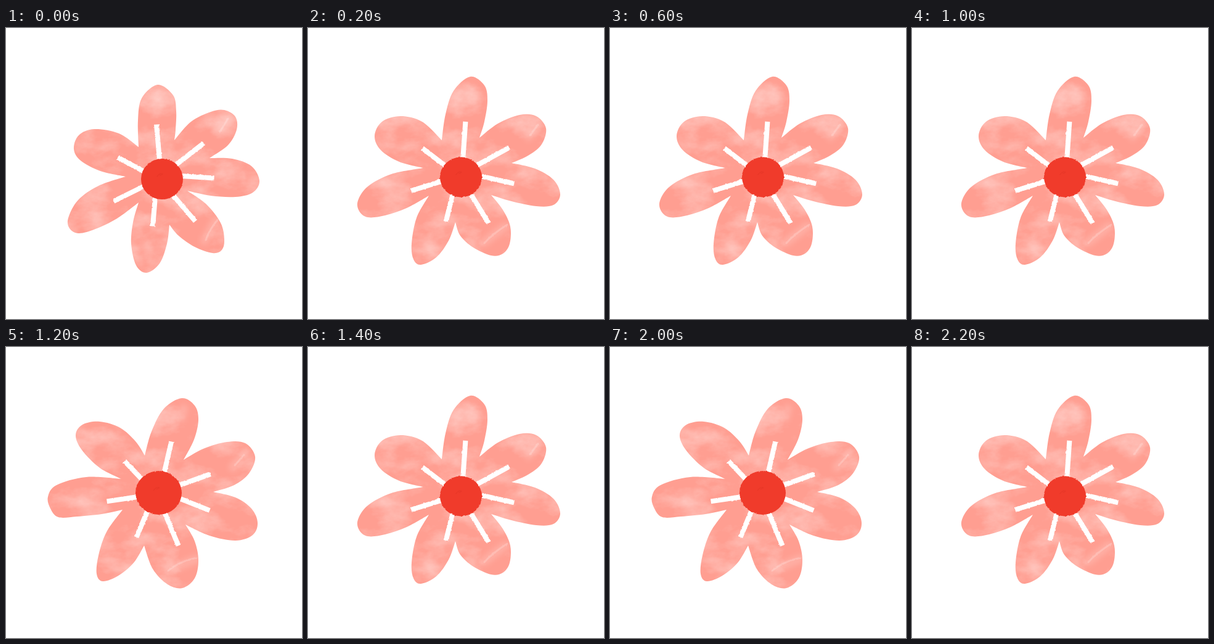
Write an HTML page that moves like this. It is 480 px wide and 472 px high and loops after 2.4 s.

```html
<!DOCTYPE html>
<html lang="en">
<head>
<meta charset="utf-8">
<title>Flower</title>
<style>
  html, body { margin: 0; width: 100%; height: 100%; overflow: hidden; background: #fff; }
  svg { display: block; width: 480px; height: 472px; }
</style>
</head>
<body>
<svg viewBox="0 0 480 472" fill="none" stroke-linecap="round">
  <defs>
    <filter id="wash" filterUnits="userSpaceOnUse" x="0" y="0" width="480" height="472" color-interpolation-filters="sRGB">
      <feTurbulence type="fractalNoise" baseFrequency=".018 .03" numOctaves="5" seed="4"/>
      <feColorMatrix values="0 0 0 0 1  0 0 0 0 1  0 0 0 0 1  .8 0 0 0 -.33"/>
      <feComposite in2="SourceGraphic" operator="atop"/>
    </filter>
    <filter id="rough" filterUnits="userSpaceOnUse" x="0" y="0" width="480" height="472" color-interpolation-filters="sRGB">
      <feTurbulence type="fractalNoise" baseFrequency=".25" numOctaves="2" seed="7"/>
      <feDisplacementMap in="SourceGraphic" scale="2.5" xChannelSelector="R" yChannelSelector="G"/>
    </filter>
    <filter id="soft" filterUnits="userSpaceOnUse" x="0" y="0" width="480" height="472">
      <feGaussianBlur stdDeviation="4"/>
    </filter>
    <clipPath id="inside"><path id="clip"/></clipPath>
  </defs>
  <path id="petals" fill="#ff9e91" filter="url(#wash)"/>
  <g clip-path="url(#inside)" stroke="#fff">
    <path id="glow" stroke-width="14" stroke-opacity=".17" filter="url(#soft)"/>
    <path id="streak" stroke-width="3" stroke-opacity=".2" filter="url(#rough)"/>
  </g>
  <g filter="url(#rough)">
    <path id="veins" stroke="#fff" stroke-width="8" stroke-linecap="butt"
      d="M244 156.5 249 214M320.5 187 274 223M337.5 243.5 284 240M307 313.5 268 268M238 321.5 242 274M174.5 281 223 257M181.5 210 226 234"/>
    <ellipse id="heart" fill="#f03b2b"/>
  </g>
  <path id="fleck" stroke="#d93224" stroke-opacity=".4" stroke-width="1.2" d="M-8-4Q-5-9 0-9M-3-6 1-8"/>
</svg>
<script>
const $ = id => document.getElementById(id);
const set = (id, attrs) => Object.entries(attrs).forEach(([k, v]) => $(id).setAttribute(k, v));

// Petals run clockwise from the top one; each starts in the notch before it.
const left = {
  petals: `215 193 214 150 220 114 246 92 271 109 276 135 275 165
    |273 182 300 152 332 136 354 133 372 144 374 165 360 190
    |330 211 367 212 398 224 411 248 400 267 372 274 332 272
    |294 264 325 286 348 316 354 343 350 360 335 365 306 355 280 337
    |265 319 261 350 249 382 228 397 211 385 203 350 206 315
    |215 283 180 309 145 326 118 333 103 325 101 308 117 279 150 256
    |194 241 153 232 121 215 110 196 118 174 143 164 183 171`,
  heart: [253, 245, 34, 33],
  turn: 'rotate(0)',
  glow: 'M230 350 234 362M345 168 362 145M322 345 340 312M252 128 248 112',
  streak: 'M324 344Q328 330 343 311M347 168 360 147'
};
const middle = {
  petals: `217 182 223 140 236 102 263 79 286 93 291 118 286 152
    |278 178 308 155 343 141 370 143 386 163 378 190 355 208
    |330 219 368 228 398 246 409 270 398 287 370 289 330 281
    |297 271 316 295 328 322 327 350 316 366 297 369 268 356 247 337
    |239 315 228 345 208 372 183 384 171 375 168 350 176 308
    |196 272 160 292 125 304 97 307 83 297 81 280 97 257 135 237
    |187 227 148 217 118 198 108 175 120 152 150 143 185 152`,
  heart: [248, 242, 34, 32.5],
  turn: 'translate(-2.5 -3.6) rotate(9 257.4 244.6)',
  glow: 'M192 345 200 352M358 176 374 154M285 348 320 322M266 112 264 98',
  streak: 'M286 349Q298 335 323 319M360 174 373 157'
};
const right = {
  petals: `225 176 236 137 256 100 285 83 306 95 312 118 305 150
    |288 183 320 165 358 154 388 156 404 178 394 205 370 224
    |336 235 372 244 398 262 408 285 400 305 372 314 330 306
    |291 288 306 315 312 346 306 375 286 391 262 385 238 360
    |224 322 207 350 182 371 157 380 147 368 150 338 163 300
    |189 264 155 271 115 275 85 276 72 262 68 243 82 224 130 211
    |187 214 152 196 123 167 113 143 124 126 152 121 185 131 210 153`,
  heart: [247.5, 236.5, 37.5, 35.5],
  turn: 'translate(-3.7 -3.2) rotate(18 257.4 244.6)',
  glow: 'M168 345 176 352M368 195 388 172M264 362 308 344M284 115 288 100',
  streak: 'M263 363Q280 348 309 342M371 192 386 175'
};

// Smooth curve along each petal, sharp corners at the notches.
function outline(text) {
  const petals = text.split('|').map(s => {
    const n = s.trim().split(/\s+/).map(Number);
    return n.flatMap((x, i) => i % 2 ? [] : [[x, n[i + 1]]]);
  });
  let d = 'M' + petals[0][0];
  petals.forEach((petal, k) => {
    const pts = [...petal, petals[(k + 1) % petals.length][0]];
    for (let i = 0; i + 1 < pts.length; i++) {
      const a = pts[i], b = pts[i + 1];
      const before = pts[i - 1] || a, after = pts[i + 2] || b;
      const c1 = a.map((v, j) => v + (b[j] - before[j]) / 6);
      const c2 = b.map((v, j) => v - (after[j] - a[j]) / 6);
      d += `C${c1} ${c2} ${b}`;
    }
  });
  return d + 'Z';
}

function show(pose) {
  const d = outline(pose.petals), [cx, cy, rx, ry] = pose.heart;
  set('petals', { d });
  set('clip', { d });
  set('glow', { d: pose.glow });
  set('streak', { d: pose.streak });
  set('veins', { transform: pose.turn });
  set('heart', { cx, cy, rx, ry });
  set('fleck', { transform: `translate(${cx} ${cy})` });
}

const sway = [left, middle, right, middle];
let shown;
function tick() {
  const pose = sway[Math.floor(performance.now() / 200) % sway.length];
  if (pose !== shown) show(shown = pose);
  requestAnimationFrame(tick);
}
tick();
</script>
</body>
</html>
```
